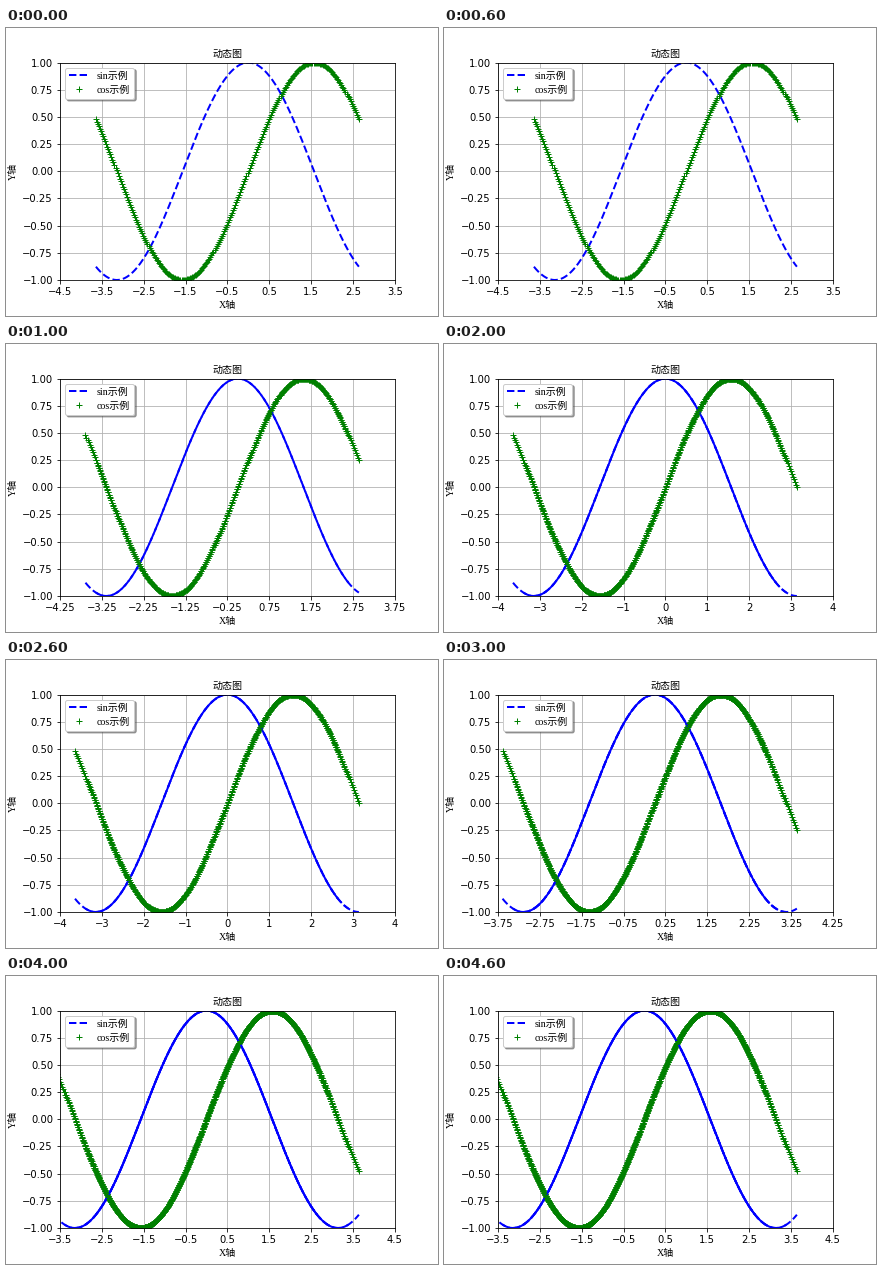
Recreate the animation shown at these times as a matplotlib script. Size 432 by 288 pixels, loop 5 s.

```python
import numpy as np
import matplotlib.pyplot as plt
from matplotlib.animation import FuncAnimation

STEPS = 5
SHIFT = 0.25
FONTS = ["Liberation Serif", "Noto Sans CJK JP"]

plt.rcParams.update({"font.size": 10, "figure.subplot.bottom": 0.125})

fig, ax = plt.subplots(figsize=(6, 4), dpi=72)
text = dict(family=FONTS, fontsize=10)
ax.set_title("动态图", **text)
ax.set_xlabel("X轴", **text)
ax.set_ylabel("Y轴", **text)
ax.set_ylim(-1, 1)
ax.set_yticks(np.linspace(-1, 1, 9))
ax.grid(True)


def add_pair(offset):
    x = np.linspace(-np.pi, np.pi, 256) + offset
    return (ax.plot(x, np.cos(x), "b--", lw=2)
            + ax.plot(x, np.sin(x), "g+"))


# Every step plots both curves again, a little further to the right.
pairs = [add_pair((k - 2) * SHIFT) for k in range(STEPS)]
ax.legend(pairs[0], ["sin示例", "cos示例"], loc="upper left", shadow=True,
          prop={"family": FONTS, "size": 10})


def update(i):
    for k, pair in enumerate(pairs):
        for line in pair:
            line.set_visible(k <= i)
    mid = (i - 2) * SHIFT
    ax.set_xlim(mid - 4, mid + 4)
    ax.set_xticks(np.linspace(mid - 4, mid + 4, 9))


anim = FuncAnimation(fig, update, frames=STEPS, interval=1000,
                     init_func=lambda: update(0), repeat=True)
plt.show()
```
